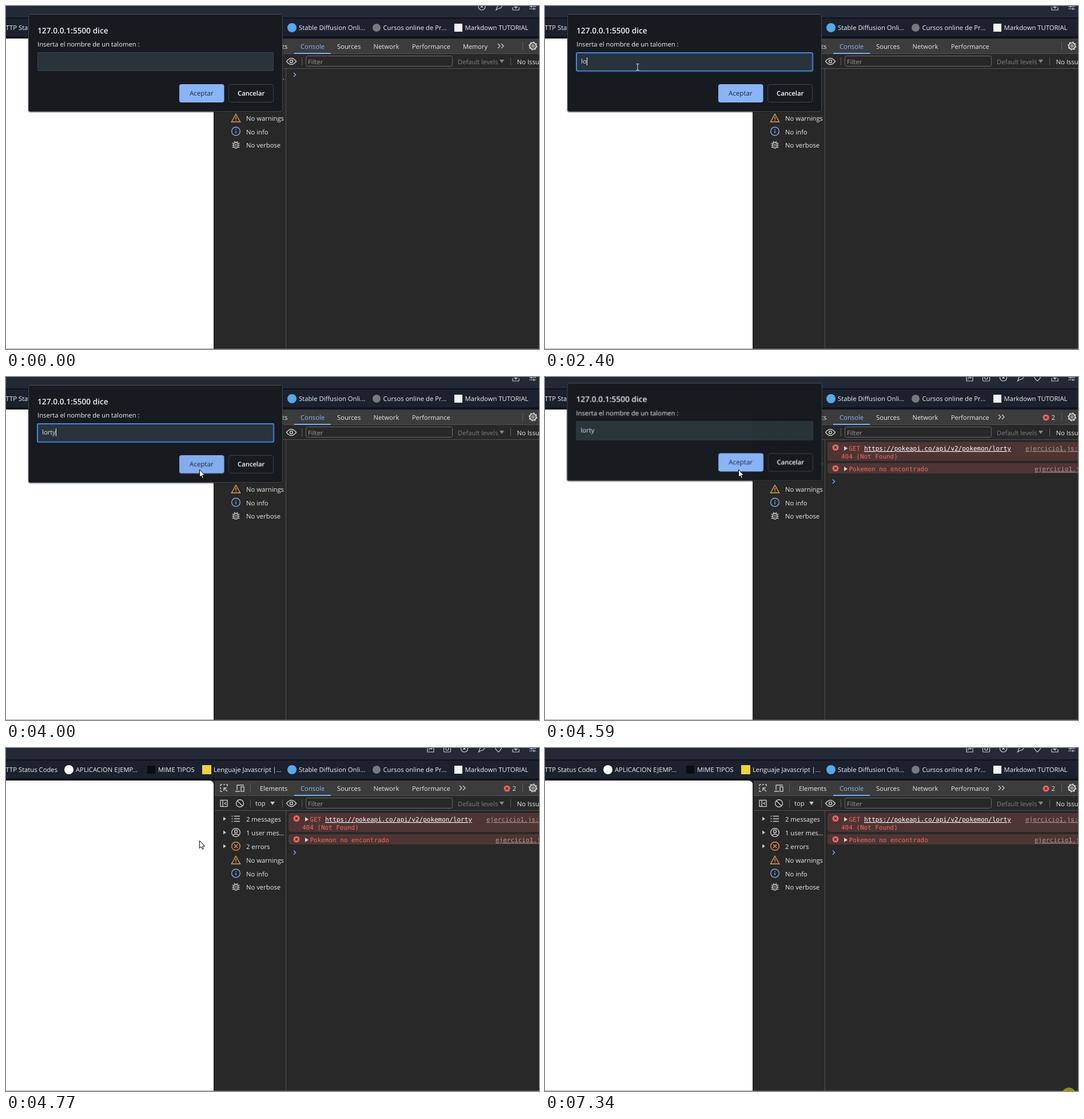
These frames come from a looping animation (932x601 px, 7.53 s). An HTML page:

```html
<!DOCTYPE html>
<html lang="es">
<head>
<meta charset="utf-8">
<title>Consola</title>
<style>
  html, body { margin: 0; width: 100%; height: 100%; overflow: hidden; background: #282828; }
  svg { display: block; width: 932px; height: 601px; }
  text { font: 11.25px "Open Sans", "Noto Sans", sans-serif; fill: #e8e8e8; text-rendering: geometricPrecision; white-space: pre; }
  .title { font-size: 13.7px; font-weight: 600; fill: #f1f1f1; }
  .bold { font-weight: 600; fill: #fff; }
  .mark text { fill: #eef0f5; }
  .dim { fill: #9b9b9b; }
  .faint { fill: #7d7d7d; }
  .blue { fill: #8ab4f8; }
  .mono text { font: 10.95px "DejaVu Sans Mono", "Noto Sans Mono", monospace; fill: #f0675e; }
  .mono .url { fill: #fff; text-decoration: underline; }
  .mono .src { fill: #a79c9b; text-decoration: underline; }
  .ico { fill: none; stroke: #c7c7c7; stroke-width: 1.4; }
  .top { fill: none; stroke: #c3c7d2; stroke-width: 1.2; }
  .sep { stroke: #5e5e5e; }
  .tri { fill: #c7c7c7; }
  #dialog { transform-origin: 261px 99px; }
</style>
</head>
<body>
<svg viewBox="0 0 932 601">
  <defs>
    <path id="more" d="M-5 -4l4 4-4 4M1 -4l4 4-4 4"/>
    <path id="arrow" d="M.5 .5V13.6L3.4 10.9 5.4 15.5 7.5 14.6 5.5 10.1H9.6Z" fill="#fff" stroke="#000" stroke-linejoin="round"/>
    <g id="fail">
      <circle r="5.5" fill="#e46962"/>
      <path d="M-2 -2l4 4m0-4l-4 4" stroke="#4e2624" stroke-width="1.3"/>
    </g>
    <g id="shield"><circle cy="1" r="6"/><path d="M-2 -1l4 4m0-4l-4 4"/></g>
    <path id="plane" d="M-5 7l2-6 5-5 4 1-2 6-6 2z"/>
  </defs>

  <!-- browser bars -->
  <rect width="932" height="57" fill="#10131e"/>
  <rect width="932" height="20" fill="#242938"/>
  <rect y="22" width="932" height="31" fill="#1c212e"/>
  <g class="top">
    <g id="topBefore">
      <use href="#shield" x="832"/><use href="#plane" x="862"/>
    </g>
    <g id="topAfter">
      <path d="M737 -4v11h11v-11M739 4l3-4 2 2 3-4"/>
      <rect x="765.500" y="-4" width="12" height="11" rx="1.500"/><circle cx="771.500" cy="1.500" r="2.500"/>
      <use href="#shield" x="801.500"/><use href="#plane" x="831.500"/>
      <path d="M855 -1Q856 3 861 7 866 3 867 -1"/>
    </g>
    <path d="M886 2v5h11v-5M891.500 -3v7m-3-3l3 3 3-3"/>
    <path d="M915 1h12M915 5h12M919 -1v4M923 3v4"/>
  </g>
  <g class="mark">
    <text x="90" y="42" text-anchor="end">HTTP Status Codes</text>
    <circle cx="110" cy="38" r="8" fill="#fff"/>
    <text x="122" y="42">APLICACION EJEMP...</text>
    <rect x="247" y="31" width="14" height="14" fill="#0b0c10"/>
    <text x="266" y="42">MIME TIPOS</text>
    <rect x="343" y="30" width="16" height="16" fill="#f0d23c"/>
    <text x="363" y="42">Lenguaje Javascript |...</text>
    <circle cx="500" cy="38" r="8" fill="#57a9ea"/>
    <text x="512" y="42">Stable Diffusion Onli...</text>
    <circle cx="648" cy="38" r="7" fill="#77797f"/>
    <text x="659.500" y="42">Cursos online de Pr...</text>
    <rect x="784" y="31" width="14" height="14" fill="#f4f4f4"/>
    <text x="802.500" y="42">Markdown TUTORIAL</text>
  </g>

  <!-- page and developer panel -->
  <rect x="365" y="57" width="567" height="544" fill="#282828"/>
  <rect x="365" y="57" width="567" height="26" fill="#3c3c3c"/>
  <path d="M363 70h2v531h-2z" fill="#222326"/>
  <path d="M0 57H355Q363 57 363 65V601H0Z" fill="#fff"/>
  <path d="M0 600.500H363" stroke="#a9a9a9"/>
  <path d="M363 600.500H932" stroke="#4a4a4a"/>
  <path class="sep" d="M365 83.500H932M365 109.500H932M489.500 110V601" opacity=".75"/>
  <path class="sep" d="M427.500 63v14M903.500 63v14M427.500 90v14M483.500 90v14M517.500 90v14M882.500 90v14"/>

  <g class="ico">
    <path d="M375 64h3m2 0h3m2 0h2v3M375 64v3m0 2v3m0 2v2h3M381 70l6 6M381 75v-5h5" />
    <path d="M404 74V65H416M401 76h8"/><rect x="411" y="68" width="5" height="8"/>
    <rect x="375" y="91.500" width="12" height="11"/><path d="M379 91.500v11M385 95l-3 2 3 2"/>
    <circle cx="409" cy="97" r="6.500"/><path d="M404.500 92.500l9 9"/>
    <path d="M490.500 97Q499 86 507.500 97 499 108 490.500 97Z"/><circle cx="499" cy="97" r="2.500"/>
    <circle cx="921.500" cy="70" r="5.500" stroke-width="2.200"/>
    <circle cx="921.500" cy="70" r="7" stroke-dasharray="2.750 2.750"/><circle cx="921.500" cy="70" r="2"/>
  </g>
  <text x="444" y="74.500">Elements</text>
  <text x="515" y="74.500" class="blue">Console</text>
  <rect x="504" y="82" width="64" height="2" fill="#7cacf8"/>
  <text x="579" y="74.500">Sources</text>
  <text x="642.500" y="74.500">Network</text>
  <text x="710" y="74.500" style="font-size:11px">Performance</text>
  <g id="tabsBefore">
    <text x="799" y="74.500" style="font-size:11px">Memory</text>
    <use href="#more" x="865" y="70" class="ico"/>
  </g>
  <g id="tabsAfter">
    <use href="#more" x="798" y="70" class="ico"/>
    <use href="#fail" x="876" y="71"/>
    <text x="885.500" y="75">2</text>
  </g>
  <text x="436" y="101">top</text>
  <path class="tri" d="M462 94h8l-4 6z"/>
  <rect x="524.500" y="87.500" width="256" height="18" rx="3" fill="#282828" stroke="#6a6a6a"/>
  <text x="528" y="102" class="dim">Filter</text>
  <text x="790" y="101.500" class="faint">Default levels</text>
  <path d="M863 94h8l-4 6z" fill="#858585"/>
  <text x="893.500" y="101.500">No Issues</text>

  <!-- sidebar -->
  <text id="countBefore" x="420" y="129">No messag...</text>
  <g id="countAfter">
    <path class="tri" d="M380 120.500l5 3.500-5 3.500zM380 144.500l5 3.500-5 3.500zM380 168.500l5 3.500-5 3.500z"/>
    <text x="420" y="129">2 messages</text>
    <text x="420" y="153">1 user mes...</text>
    <text x="420" y="176.500">2 errors</text>
  </g>
  <g class="ico">
    <path d="M398.500 119.500h10.500M398.500 124h10.500M398.500 128.500h10.500M394.500 119.500h2M394.500 124h2M394.500 128.500h2"/>
    <circle cx="402" cy="148" r="7.300"/><circle cx="402" cy="146" r="2.500"/><path d="M397 153Q402 148.500 407 153"/>
    <g stroke="#e8944a"><circle cx="402" cy="172" r="7.300"/><path d="M399 169l6 6m0-6l-6 6"/></g>
    <path d="M402 189.500L409.500 203H394.500ZM402 194v4.500m0 1v1.500" stroke="#e8a04a"/>
    <path d="M402 218.500v4.500m0-7.500v1.500" stroke="#7cacf8"/><circle cx="402" cy="219.500" r="7.300" stroke="#7cacf8"/>
    <rect x="398.500" y="239" width="7" height="10" rx="3.500"/>
    <path d="M395.500 240.500h3m7 0h3M395.500 244h3m7 0h3M395.500 247.500h3m7 0h3M399 237l1.500 2m4.500-2l-1.500 2M400.500 242.500h3m-3 3h3"/>
  </g>
  <text x="420" y="200.500">No warnings</text>
  <text x="420" y="224.500">No info</text>
  <text x="420" y="248">No verbose</text>

  <!-- console -->
  <path id="promptBefore" class="ico" style="stroke:#7cacf8" d="M503 117l3.500 3.500-3.500 3.500"/>
  <g id="log" class="mono">
    <path d="M932 114H499Q494 114 494 119V142Q494 147 499 147H932ZM932 151H499Q494 151 494 156V164Q494 169 499 169H932Z" fill="#4e3534"/>
    <use href="#fail" x="508" y="123.500"/><use href="#fail" x="508" y="160"/>
    <path d="M523 121l6 4-6 4zM523 157l6 4-6 4z" fill="#d6cfce"/>
    <text x="531.500" y="129">GET</text>
    <text x="558" y="129" class="url">https://pokeapi.co/api/v2/pokemon/lorty</text>
    <text x="840" y="129" class="src">ejercicio1.js:4</text>
    <text x="518" y="143">404 (Not Found)</text>
    <text x="531.500" y="165">Pokemon no encontrado</text>
    <text x="856" y="165" class="src">ejercicio1.js:9</text>
    <path class="ico" style="stroke:#7cacf8" d="M503 179.500l3.500 3.500-3.500 3.500"/>
  </g>

  <!-- prompt dialog -->
  <g id="dialog">
    <rect x="38" y="14" width="447" height="173" rx="4" opacity=".25"/>
    <rect x="39.500" y="14.500" width="444" height="170.500" rx="3" fill="#171a1f" stroke="#4b4e52"/>
    <text x="55" y="47.500" class="title">127.0.0.1:5500 dice</text>
    <text x="55" y="71" style="fill:#f1f1f1">Inserta el nombre de un talomen :</text>
    <rect x="55.500" y="81.500" width="412" height="32" rx="1.500" fill="#28333b" stroke="#3b464e"/>
    <rect id="focus" x="55" y="82" width="413" height="32" rx="2" fill="#28333b" stroke="#4287ea" stroke-width="2"/>
    <g id="typed"></g>
    <rect id="caret" x="63" y="90" width="1" height="14" fill="#fff"/>
    <rect id="ok" x="303" y="137" width="78.500" height="32" rx="4" fill="#8ab4f8"/>
    <text x="321" y="157" style="font-size:11.6px;fill:#1d2a3f">Aceptar</text>
    <rect x="389.500" y="137.500" width="78" height="31" rx="4" fill="none" stroke="#41454a"/>
    <text x="405" y="157" class="bold">Cancelar</text>
  </g>

  <g fill="#fff000" fill-opacity=".5">
    <circle id="click1" cx="160" cy="107" r="12"/>
    <circle id="click2" cx="338" cy="162" r="12"/>
    <circle id="click3" cx="916" cy="607" r="12"/>
  </g>
  <g id="pointer">
    <use id="hand" href="#arrow"/>
    <path id="beam" d="M-2.500 -5.500h2l.5.500.5-.5h2M-2.500 5.500h2l.5-.5.5.5h2M0 -5V5" fill="none" stroke="#e6e6e6"/>
  </g>
</svg>
<script>
const LOOP = 7530;
const $ = id => document.getElementById(id);
const anims = [];

// rows: [ms, properties, easing until the next row]
function play(el, rows) {
  const all = [[0, rows[0][1], 'step-end'], ...rows, [LOOP, rows[rows.length - 1][1]]];
  anims.push(el.animate(
    all.map(([ms, props, easing = 'linear']) => ({ offset: ms / LOOP, easing, ...props })),
    { duration: LOOP, iterations: Infinity }));
}

function show(el, ...spans) {
  const rows = [[0, { opacity: 0 }, 'step-end']];
  for (const [from, to] of spans) {
    rows.push([from, { opacity: 1 }, 'step-end']);
    if (to < LOOP) rows.push([to, { opacity: 0 }, 'step-end']);
  }
  play(el, rows);
}

const at = (x, y) => ({ transform: `translate(${x}px, ${y}px)` });

// typing
const word = 'lorty';
const keys = [1600, 2150, 2400, 2550, 2700, 2850, LOOP];
const caretRows = [[0, at(0, 0), 'step-end']];
for (let i = 1; i <= word.length; i++) {
  const text = document.createElementNS('http://www.w3.org/2000/svg', 'text');
  text.setAttribute('x', 63);
  text.setAttribute('y', 101);
  text.textContent = word.slice(0, i);
  $('typed').append(text);
  caretRows.push([keys[i], at(Math.round(text.getComputedTextLength() + .5), 0), 'step-end']);
  show(text, [keys[i], keys[i + 1]]);
}
play($('caret'), caretRows);
show($('caret'), [1600, 3370], [3870, 4130]);
show($('focus'), [1600, 4130]);

// page state
const SWAP = 4500, REPLY = 4560;
for (const [name, ms] of [['top', SWAP], ['tabs', REPLY], ['count', REPLY]]) {
  show($(name + 'Before'), [0, ms]);
  show($(name + 'After'), [ms, LOOP]);
}
show($('promptBefore'), [0, REPLY]);
show($('log'), [REPLY, LOOP]);

play($('ok'), [
  [3860, { fill: '#8ab4f8' }],
  [3960, { fill: '#84acee' }],
  [4500, { fill: '#84acee' }],
  [4560, { fill: '#8ab4f8' }]
]);

const lift = (y, size, opacity) => ({ transform: `translateY(${y}px) scale(${size})`, opacity });
play($('dialog'), [
  [4540, lift(0, 1, 1)],
  [4590, lift(-3.5, 1.003, 1)],
  [4755, lift(-8, 1.018, 0)]
]);

// pointer
play($('pointer'), [
  [290, at(862, 602), 'cubic-bezier(.3,.1,.35,1)'],
  [1030, at(163, 127)],
  [1050, at(163, 127), 'ease-in-out'],
  [1390, at(162, 107)],
  [3370, at(162, 107), 'cubic-bezier(.4,0,.3,1)'],
  [3990, at(338, 162)],
  [5830, at(338, 162), 'cubic-bezier(.45,0,.75,.75)'],
  [6120, at(713, 377), 'cubic-bezier(.2,.5,.5,1)'],
  [6550, at(918, 604)]
]);
show($('hand'), [290, 1270], [3510, 6550]);
show($('beam'), [1270, 3510]);
show($('click1'), [1590, 1800]);
show($('click2'), [4130, 4340]);
show($('click3'), [7340, LOOP]);

const start = document.timeline.currentTime;
for (const a of anims) a.startTime = start;
</script>
</body>
</html>
```
